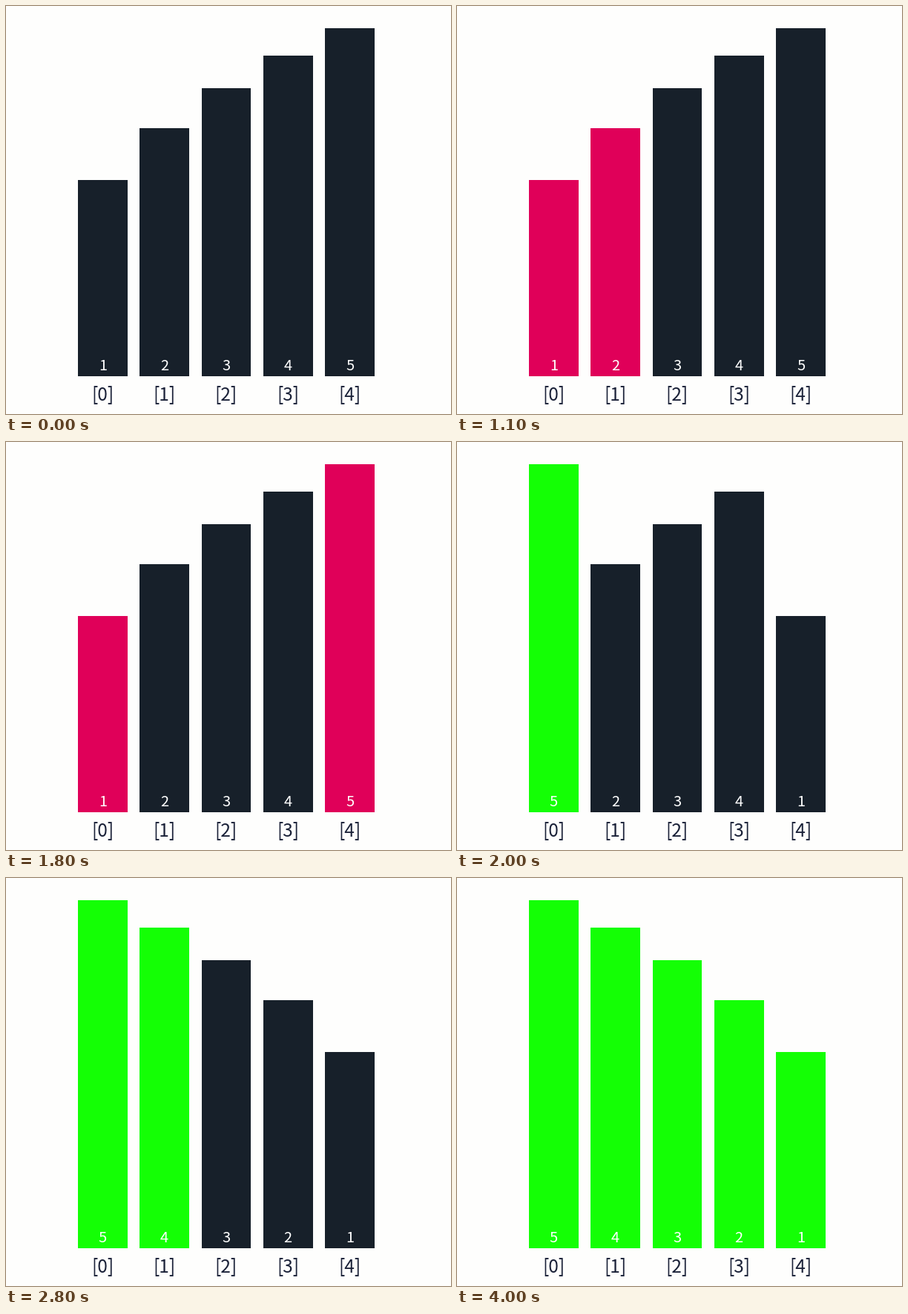
Recreate the animation shown at these times as a matplotlib script. Size 600 by 551 pixels, loop 6000 ms.

```python
import matplotlib.pyplot as plt
from matplotlib.animation import FuncAnimation
from matplotlib.patches import Rectangle

W, H, DPI = 600, 551, 100
TICK, LOOP = 100, 6000
BACK, IDLE, ACTIVE, DONE = "#fefefd", "#17202a", "#e00059", "#14ff05"
TEXT = "#1a2138"
FONT = "Noto Sans CJK JP"

LEFT, STEP, BAR_W, BASE = 97, 83.3, 66.7, 500
TOPS = {1: 235, 2: 164.6, 3: 111, 4: 67, 5: 29.5}

# Moments (ms) at which each sorting step appears
TIMES = [0, 1100, *range(1400, 3401, 200), 3700, 3900]


def sort_steps(vals):
    """Descending selection sort as (values, colours) snapshots."""
    vals, n = list(vals), len(vals)
    yield tuple(vals), (IDLE,) * n
    for i in range(n - 1):
        best = i
        for j in range(i + 1, n):
            cols = [DONE if k < i else ACTIVE if k in (i, j) else IDLE
                    for k in range(n)]
            yield tuple(vals), tuple(cols)
            if vals[j] > vals[best]:
                best = j
        vals[i], vals[best] = vals[best], vals[i]
        done = n if i == n - 2 else i + 1
        yield tuple(vals), (DONE,) * done + (IDLE,) * (n - done)


STEPS = list(sort_steps(range(1, 6)))

fig = plt.figure(figsize=(W / DPI, H / DPI), dpi=DPI, facecolor=BACK)
ax = fig.add_axes([0, 0, 1, 1])
ax.set(xlim=(0, W), ylim=(H, 0))
ax.axis("off")


def label(x, y, s, px, color):
    return ax.text(x, y, s, fontsize=px * 72 / DPI, color=color,
                   family=FONT, ha="center", va="baseline")


bars, nums = [], []
for k in range(5):
    x = LEFT + k * STEP
    mid = x + BAR_W / 2
    bars.append(ax.add_patch(Rectangle((x, BASE), BAR_W, 0, lw=0)))
    nums.append(label(mid, 491.5, "", 20, "white"))
    label(mid, 533, f"[{k}]", 24.5, TEXT)


def draw(frame):
    now = frame * TICK
    step = sum(t <= now for t in TIMES) - 1
    for bar, num, val, col in zip(bars, nums, *STEPS[step]):
        bar.set_height(TOPS[val] - BASE)
        bar.set_facecolor(col)
        num.set_text(str(val))
    return bars + nums


anim = FuncAnimation(fig, draw, frames=LOOP // TICK, interval=TICK,
                     repeat=True, repeat_delay=0)
plt.show()
```
